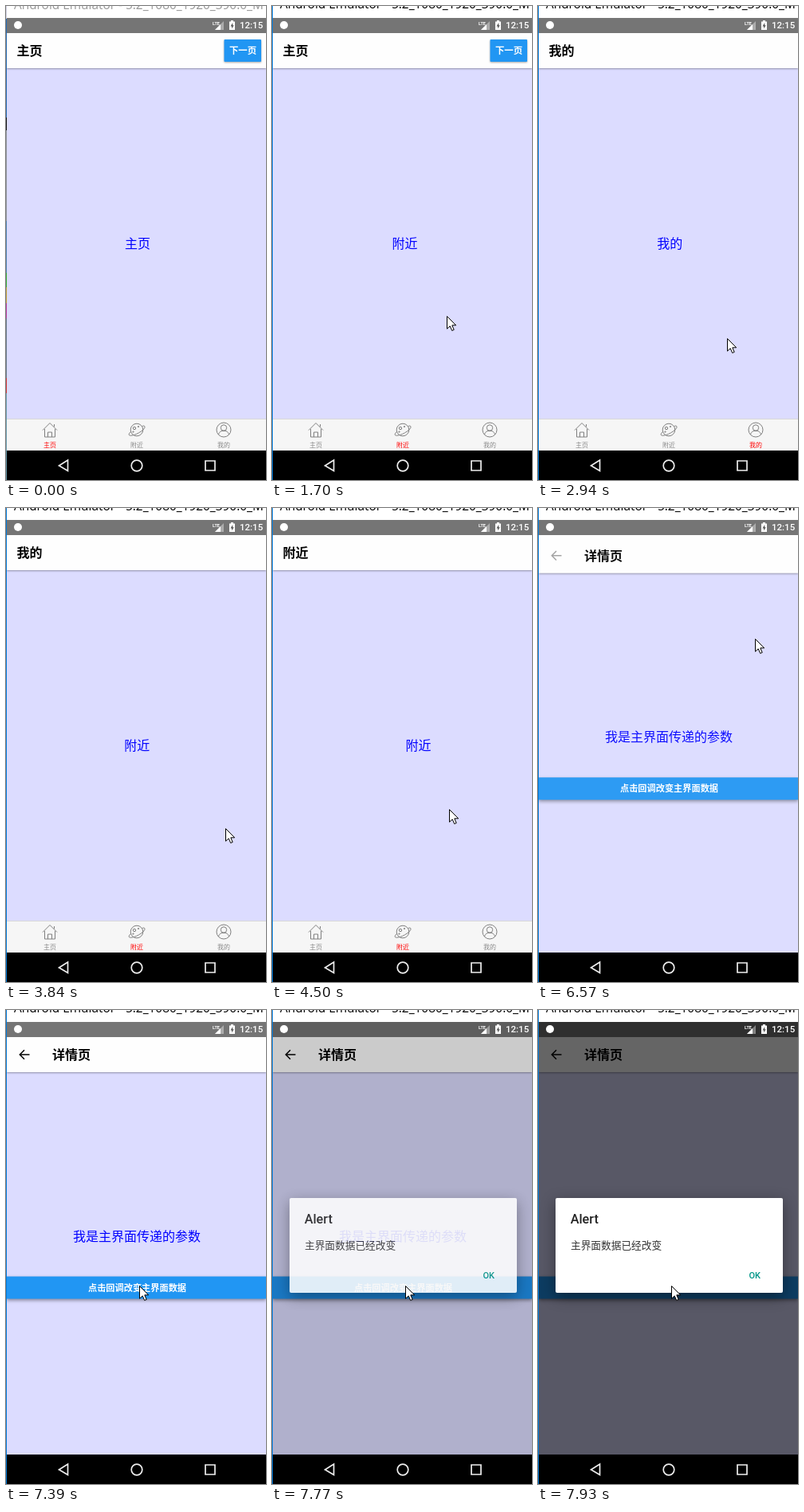
Write an HTML page that moves like this. It is 326 px wide and 595 px high and loops after 8 s.

```html
<!DOCTYPE html>
<html lang="zh">
<head>
<meta charset="utf-8">
<style>
html, body { margin: 0; width: 100%; height: 100%; overflow: hidden; background: #fff; }
svg { display: block; }
text { font-family: Roboto, "Noto Sans CJK SC", "Noto Sans CJK", sans-serif; white-space: pre; }
#caption { font: 15.4px "Open Sans", sans-serif; }
#edge { position: absolute; left: 0; top: 0; width: 1px; height: 595px;
  background: linear-gradient(#ccd 0 16px, #2468b0 0 140px, #111 0 156px, #8b9097 0 270px, #4c7fae 0 335px,
    #3a3 0 353px, #b93 0 373px, #b2389b 0 392px, #678 0 467px, #c33 0 486px, #69a 0); }
.mid { text-anchor: middle; }
.title { font-size: 16px; font-weight: 700; }
.body { font-size: 16px; fill: #00f; text-anchor: middle; }
.button { font-weight: 700; fill: #fff; text-anchor: middle; }
.tab text { font-size: 8px; text-anchor: middle; }
.line { fill: none; stroke: #808080; stroke-width: 1; }
.soft { filter: drop-shadow(0 1px 1px rgba(0,0,0,.35)); }
.lift { filter: drop-shadow(0 2px 2px rgba(0,0,0,.4)); }
.card { filter: drop-shadow(0 5px 9px rgba(0,0,0,.4)); }
</style>
</head>
<body>
<div id="edge"></div>
<svg width="326" height="595" viewBox="0 0 326 595">
  <clipPath id="screen"><path d="M1 34H326V558H1Z"/></clipPath>
  <text id="caption" x="10">Android Emulator - 5.2_1080_1920_390.0_M</text>
  <path fill="#757575" d="M1 15H326V34H1Z"/>

  <g clip-path="url(#screen)">
    <g id="home">
      <path fill="#dcdcff" d="M1 34H326V518H1Z"/>
      <g id="pages">
        <text class="body" x="165" y="304">主页</text>
        <text class="body" x="490" y="304">附近</text>
        <text class="body" x="815" y="304">我的</text>
      </g>
      <path class="soft" fill="#fefefe" d="M1 30H326V78H1Z"/>
      <text id="heading" class="title" x="13.5" y="62"></text>
      <g id="next">
        <rect class="soft" x="273.5" y="42" width="46.5" height="28" rx="1" fill="#2196f3"/>
        <text class="button" x="297" y="60.3" font-size="11.4">下一页</text>
      </g>
      <path fill="#f6f6f6" d="M1 518H326V558H1Z"/>
      <path stroke="#d8d8d8" d="M1 518.5H326"/>
      <g class="tab">
        <path class="line" d="M46 532.5 55 523.5 64 532.5M48.5 531V541H61.5V531M52.5 541V535H57.5V541M60.5 528V525"/>
        <text x="55" y="554">主页</text>
      </g>
      <g class="tab">
        <g class="line">
          <circle cx="164" cy="532" r="7.8"/>
          <path d="M157 534C153 537 153 540 158 539 165 538 175 531 174 528 173.5 526.5 172 527 170.5 527.5"/>
          <circle cx="161" cy="530" r="1.7"/><circle cx="166" cy="528" r=".7"/><circle cx="159.5" cy="534.5" r=".7"/>
        </g>
        <text x="164" y="554">附近</text>
      </g>
      <g class="tab">
        <g class="line">
          <circle cx="273" cy="532" r="9"/><circle cx="273" cy="529.5" r="3.7"/>
          <path d="M266.500 538C267.500 534 270 533.300 273 533.300S278.500 534 279.500 538"/>
        </g>
        <text x="273" y="554">我的</text>
      </g>
    </g>

    <g id="detail">
      <path fill="#dcdcff" d="M1 34H326V560H1Z"/>
      <path class="soft" fill="#fefefe" d="M1 30H326V78H1Z"/>
      <path id="arrow" fill="none" stroke="#000" stroke-width="1.5" d="M29.5 56H17.5M23 50.3 17.3 56 23 61.7"/>
      <text class="title" x="58" y="62">详情页</text>
      <text class="body" x="164" y="289.5">我是主界面传递的参数</text>
      <path class="lift" fill="#2196f3" d="M1 334.5H326V362.5H1Z"/>
      <text class="button" x="164.5" y="352.5" font-size="11.2">点击回调改变主界面数据</text>
    </g>
  </g>

  <path id="dim" d="M1 15H326V558H1Z"/>

  <g fill="#fff">
    <circle cx="15" cy="24" r="5"/>
    <text x="259" y="24" font-size="5.5" font-weight="700">LTE</text>
    <path fill-opacity=".4" d="M273 19V30H262Z"/><path d="M269 23V30H262Z"/>
    <path d="M280 19.5H282V18H285V19.5H287V30H280Z"/>
    <path fill="#555" d="M284.3 21 281.5 25.5H283.2V28.5L285.7 24.2H284.3Z"/>
    <text x="293" y="28.3" font-size="11.5" font-weight="500">12:15</text>
  </g>
  <path d="M1 558H326V595H1Z"/>
  <g fill="none" stroke="#eee" stroke-width="1.7">
    <path d="M77.5 570V583.5L66.5 577Z"/><circle cx="164" cy="577" r="6.8"/><path d="M250 571H262V583H250Z"/>
  </g>

  <g id="alert">
    <rect class="card" x="22" y="236" width="285" height="119" rx="2" fill="#fff"/>
    <text x="40.7" y="267.5" font-size="16.2" font-weight="500" fill="#222">Alert</text>
    <text x="41" y="299.5" font-size="12.7" fill="#333">主界面数据已经改变</text>
    <text x="264.5" y="336.5" font-size="11" font-weight="500" fill="#009688">OK</text>
  </g>
  <path id="cursor" fill="#fff" stroke="#000" d="M.5 .5V16.2L4.2 12.8 6.7 18.5 9.2 17.4 6.8 11.8H11.7Z"/>
</svg>
<script>
const LOOP = 8000, REFRESH = 73, PAGE = 325;
const names = ['主页', '附近', '我的'];
const tabs = document.querySelectorAll('.tab text');
const $ = id => document.getElementById(id);

// Release time, direction, softness of the fling
const swipes = [[1473, 1, 37], [2509, 1, 45], [3536, -1, 45], [4646, -1, 59]];
// Start, end, target x, target y
const moves = [
  [47, 340, 245, 409], [500, 790, 268, 385], [1107, 1600, 219, 389], [1927, 2290, 290, 410],
  [2364, 2620, 237, 417], [3027, 3300, 212, 408], [3318, 3610, 275, 402], [3906, 4350, 205, 380],
  [4425, 4665, 281, 372], [5168, 5460, 305, 294], [5687, 6200, 285, 56], [6440, 6560, 272, 164],
  [6640, 6790, 263, 191], [6957, 7390, 167, 346]
];

// The screen is redrawn in steps counted from an origin
const tick = (t, origin) => Math.floor((t - origin) / REFRESH) * REFRESH;
const clamp = v => Math.max(0, Math.min(1, v));
const progress = (t, a, b) => t >= b ? 1 : clamp(tick(t, a) / (b - a));
const smooth = k => k * k * (3 - 2 * k);
const logistic = v => 1 / (1 + Math.exp(-v));
const sum = f => swipes.reduce((n, s) => n + f(...s), 0);

const move = (id, x, y) => $(id).setAttribute('transform', `translate(${x} ${y})`);
const fade = (id, v) => $(id).setAttribute('opacity', v);

function drawHome(t) {
  const scroll = sum((at, dir, soft) => dir * logistic((tick(t, at) - 20) / soft));
  const tab = sum((at, dir) => t > at + 60 ? dir : 0);
  const head = sum((at, dir) => t > at + 430 ? dir : 0);
  move('pages', -scroll * PAGE, 0);
  tabs.forEach((el, i) => el.setAttribute('fill', i === tab ? '#f00' : '#888'));
  $('heading').textContent = names[head];
  fade('next', head ? 0 : 1);
}

function drawDetail(t) {
  const open = t >= 6510, k = clamp((t - 6440) / 350), left = (1 - k) ** 5.5;
  fade('home', open ? 0 : 1);
  fade('detail', open ? 1 - .7 * left : 0);
  fade('arrow', k);
  move('detail', 0, 50 * left);
}

function drawAlert(t) {
  const k = progress(t, 7697, 7917);
  fade('dim', .6 * k);
  fade('alert', 1 - (1 - k) ** 5);
}

function drawCursor(t) {
  let x = 259, y = 595;
  for (const [a, b, toX, toY] of moves) {
    const k = smooth(progress(t, a, b));
    x += (toX - x) * k;
    y += (toY - y) * k;
  }
  move('cursor', Math.round(x), Math.round(y));
}

function draw(t) {
  const active = t >= 1020;
  $('edge').style.background = active ? '#0078d7' : '';
  $('caption').setAttribute('fill', active ? '#000' : '#999');
  $('caption').setAttribute('y', active ? 2.5 : 3.5);
  drawHome(t);
  drawDetail(t);
  drawAlert(t);
  drawCursor(t);
}

function loop() {
  draw(performance.now() % LOOP);
  requestAnimationFrame(loop);
}
loop();
</script>
</body>
</html>
```
